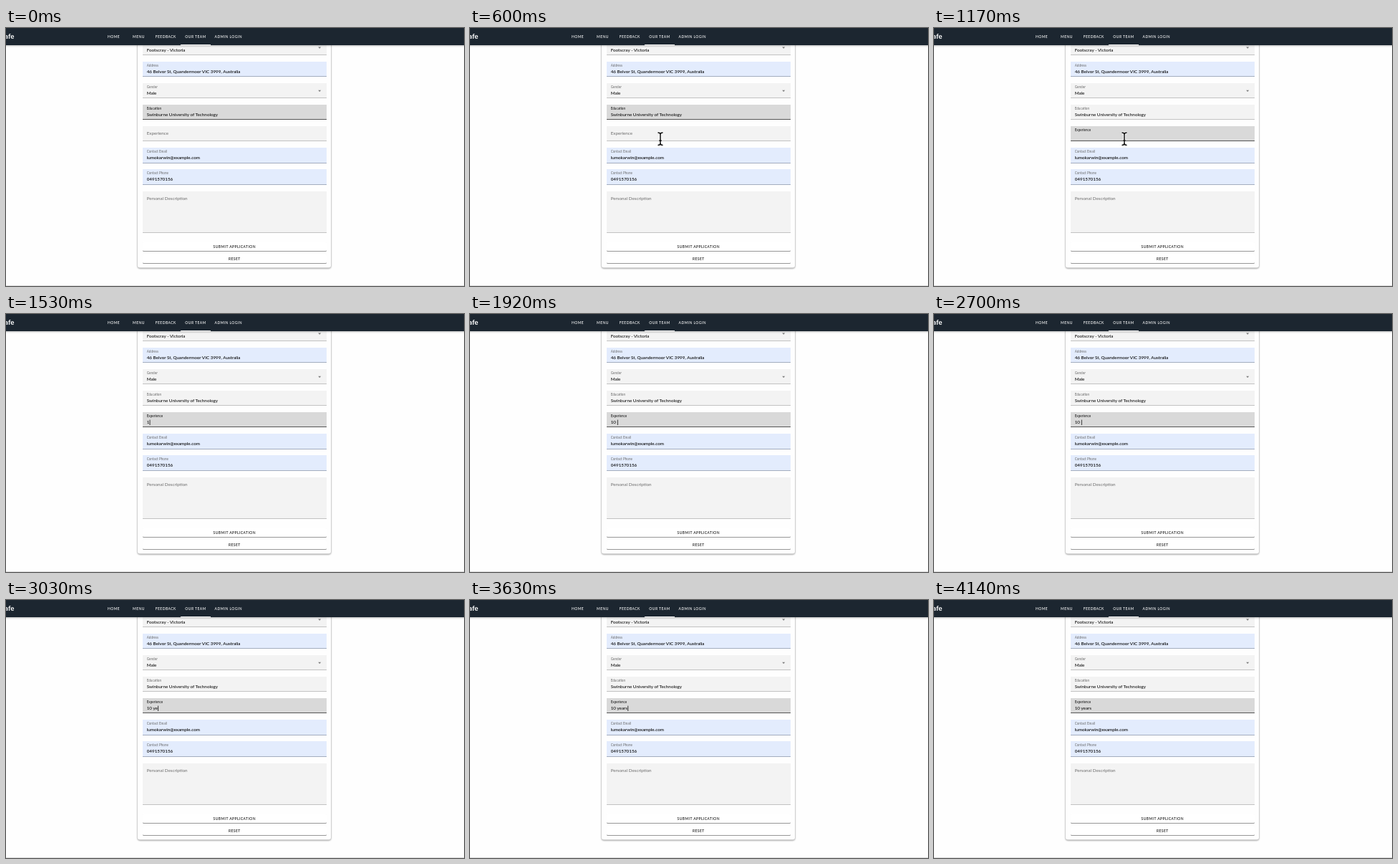
An HTML page that plays this animation: 640 px wide and 360 px high, repeating every 4.17 s.

```html
<!DOCTYPE html>
<html lang="en">
<head>
<meta charset="utf-8">
<title>Application form</title>
<style>
  html, body { margin: 0; width: 100%; height: 100%; overflow: hidden; background: #fefefe; }
  svg { display: block; width: 640px; height: 360px; font-family: Lato, "Open Sans", sans-serif; }
  .card { fill: #fefefe; filter: drop-shadow(0 1px 1px #0005) drop-shadow(0 0 1px #0003); }
  .button { fill: #fff; filter: drop-shadow(0 1px .5px #0006); }
  .caps { font-size: 5px; letter-spacing: .43px; font-weight: 500; text-anchor: middle; }
  .value { font-size: 6.3px; font-weight: 500; fill: #111; }
  .label { font-size: 4.65px; fill: #6c6c6c; }
  .hint { font-size: 6.25px; fill: #6c6c6c; }
  .auto { fill: #000; }
</style>
</head>
<body>
<svg viewBox="0 0 640 360" id="stage">
  <defs>
    <linearGradient id="fade" x2="0" y2="1">
      <stop stop-color="#000" stop-opacity=".2"/>
      <stop offset="1" stop-color="#000" stop-opacity="0"/>
    </linearGradient>
  </defs>
</svg>
<script>
const stage = document.getElementById('stage');
const LOOP = 4170, FOCUS = 660;
const GREY = '#f3f3f3', BLUE = '#e3ecfd', ACTIVE = '#d9d9d9';
const LINE = '#c2c2c2', BLUE_LINE = '#a3adbf', ACTIVE_LINE = '#555';

function add(tag, attrs, text) {
  const el = document.createElementNS('http://www.w3.org/2000/svg', tag);
  set(el, attrs);
  if (text) el.textContent = text;
  return stage.appendChild(el);
}
function set(el, attrs) {
  for (const key in attrs) el.setAttribute(key, attrs[key]);
}
function rect(x, y, width, height, fill, more) {
  return add('rect', { x, y, width, height, fill, ...more });
}
function label(x, y, text, cls, fill) {
  const el = add('text', { x, y, class: cls }, text);
  if (fill) el.style.fill = fill;
  return el;
}
function field(y, h, name, value, auto) {
  const box = rect(191, y, 257, h, auto ? BLUE : GREY);
  const line = rect(191, y + h - 1, 257, 1, auto ? BLUE_LINE : LINE);
  const tag = label(196.7, y + 7.2, name, 'label');
  const text = label(196.7, y + 16, value, auto ? 'value auto' : 'value');
  return { box, line, tag, text };
}
function arrow(y) {
  add('path', { d: `M436.2 ${y}h4l-2 2.2z`, fill: '#777' });
}
function button(y, text) {
  rect(191, y, 257, 13, '#fff', { class: 'button', rx: 1.5 });
  label(319.3, y + 8.7, text, 'caps', '#111');
}

rect(184, 5, 270, 329.5, '#fefefe', { class: 'card', rx: 3 });
field(17, 21, '', 'Footscray - Victoria');
arrow(26.5);
field(47, 21, 'Address', '46 Belvor St, Quandermoor VIC 3999, Australia', true);
field(77, 21, 'Gender', 'Male');
arrow(86.8);
const education = field(107, 21, 'Education', 'Swinburne University of Technology');
const experience = field(137, 21, 'Experience', '');
field(167, 22, 'Contact Email', 'lumokarwin@example.com', true);
field(197, 22, 'Contact Phone', '0491570156', true);
field(228, 58, '', '');
label(196.7, 240, 'Personal Description', 'hint');
button(298, 'SUBMIT APPLICATION');
button(315, 'RESET');
rect(0, 359, 640, 1, '#dcdcdc');

rect(0, 24, 640, 3, 'url(#fade)');
rect(0, 0, 640, 24, '#1c2630');
add('text', { x: 11.6, y: 15, fill: '#fff', 'font-size': 9.8, 'font-weight': 700, 'text-anchor': 'end' }, 'Cafe');
[[150.5, 'HOME'], [185.5, 'MENU'], [223.3, 'FEEDBACK'], [265, 'OUR TEAM'], [310.8, 'ADMIN LOGIN']]
  .forEach(([x, text]) => label(x, 13.6, text, 'caps', '#fff'));
rect(244, 23, 42, 1, '#fff');

const caret = rect(0, 147.6, .8, 7.4, '#111');
const beam = 'M-3.5-8.5Q0-8.5 0-6Q0-8.5 3.5-8.5M0-6.5V7M-3.5 9Q0 9 0 6.5Q0 9 3.5 9M-1.8 2.8H1.8';
const pointer = add('g', {});
[['#fff', 3], ['#111', 1.5]].forEach(([stroke, width]) =>
  pointer.appendChild(add('path', { d: beam, fill: 'none', stroke, 'stroke-width': width })));

// [time, typed text, caret shown]
const typing = [
  [0, '', 0], [FOCUS, '', 1], [1150, '', 0],
  [1500, '1', 1], [1620, '10', 1], [1770, '10 ', 1],
  [2250, '10 Y', 0], [2550, '10 ', 1], [2730, '10 y', 1], [2910, '10 ye', 1],
  [3120, '10 yea', 1], [3240, '10 year', 1], [3390, '10 years', 1], [3870, '10 years', 0]
];

function highlight(f, on) {
  set(f.box, { fill: on ? ACTIVE : GREY });
  set(f.line, { fill: on ? ACTIVE_LINE : LINE });
  f.tag.style.fill = on ? '#111' : '';
}

function draw(now) {
  const t = now % LOOP;
  const focused = t >= FOCUS;
  highlight(education, !focused);
  highlight(experience, focused);

  const lift = 1 - (1 - Math.min(1, Math.max(0, (t - FOCUS) / 150))) ** 3;
  experience.tag.style.fontSize = 6.25 - 1.6 * lift + 'px';
  set(experience.tag, { y: 149.4 - 5.2 * lift });

  const [, text, shown] = typing.findLast(step => step[0] <= t);
  experience.text.textContent = text.trimEnd();
  const width = text ? experience.text.getComputedTextLength() : 0;
  set(caret, { x: 197 + width + (text.endsWith(' ') ? 1.6 : 0), opacity: shown });

  const move = Math.min(1, Math.max(0, (t - 300) / 300));
  const ease = move * move * (3 - 2 * move);
  set(pointer, {
    transform: `translate(${274 - 8 * ease} ${136 + 18.5 * ease})`,
    opacity: t >= 300 && t < 1500 ? 1 : 0
  });
}

function tick() {
  draw(performance.now());
  requestAnimationFrame(tick);
}
tick();
</script>
</body>
</html>
```
